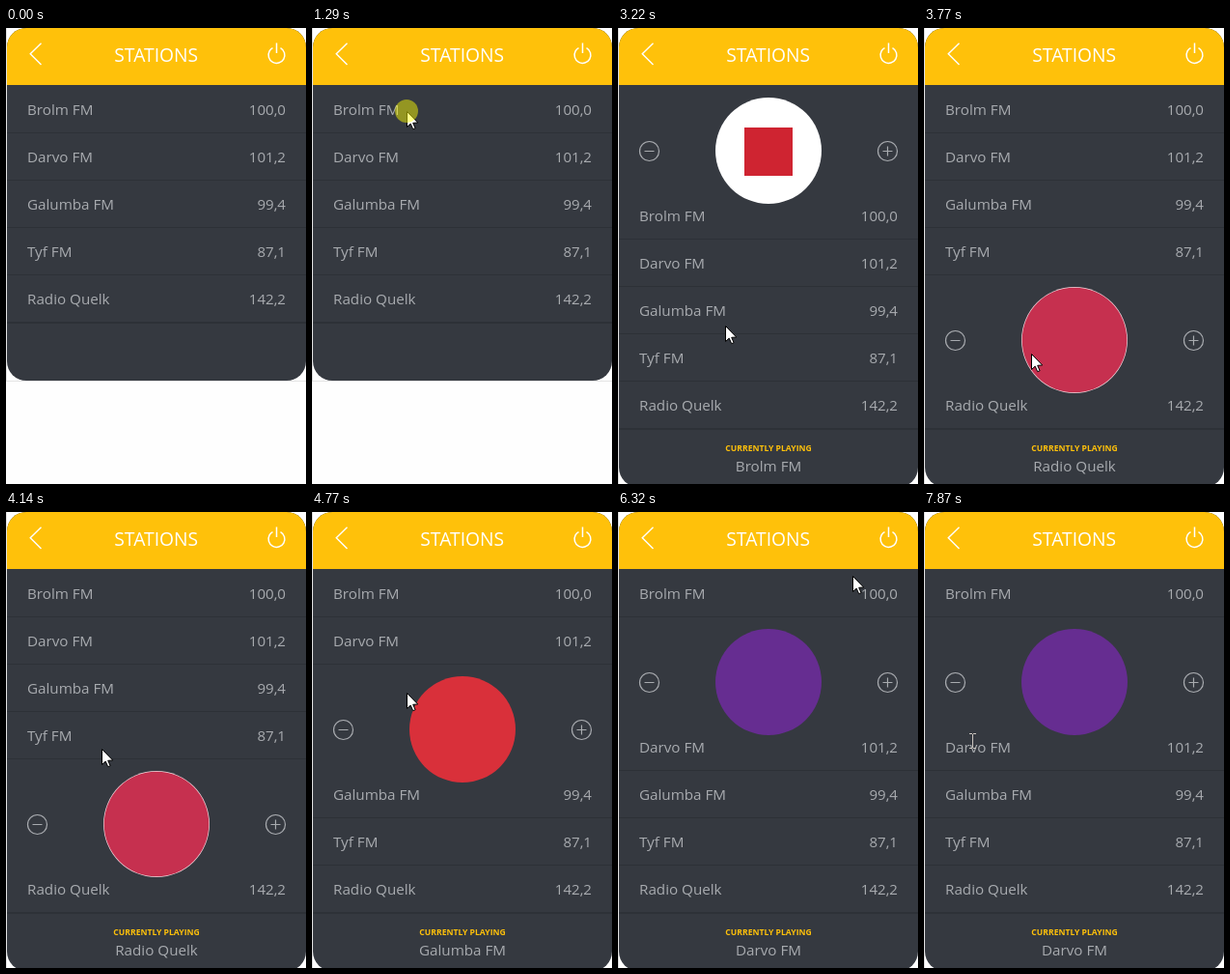
An HTML page with a canvas that plays this animation: 311 by 472 pixels, repeating every 8 s.

```html
<!DOCTYPE html>
<html lang="en">
<head>
<meta charset="utf-8">
<title>Stations</title>
<style>
html, body { margin: 0; width: 100%; height: 100%; overflow: hidden; background: #fefefe; }
canvas { display: block; width: 311px; height: 472px; }
</style>
</head>
<body>
<canvas id="stage"></canvas>
<script>
const W = 311, H = 472, LOOP = 8000, STEP = 75;
const HEADER = 60, ROW = 49, FOOTER = 60, GROW = 110, RADIUS = 55;
const MID = 156, LEFT = 22, RIGHT = 290;
const YELLOW = '#ffc10a', DARK = '#353940', GREY = '#a8abaf', RULE = '#2d3137', EDGE = '#e4e4e4';
const FONT = '"Open Sans", "Noto Sans", sans-serif';

const stations = [
  { name: 'Brolm FM', freq: '100,0', disc: '#fff', badge: '#cf2431' },
  { name: 'Darvo FM', freq: '101,2', disc: '#662d91' },
  { name: 'Galumba FM', freq: '99,4', disc: '#d9303a' },
  { name: 'Tyf FM', freq: '87,1', disc: '#fff' },
  { name: 'Radio Quelk', freq: '142,2', disc: '#c6304f', rim: '#f0d5db' }
];

const BUTTONS_AT = 1850;
const clicks = [
  { down: 1290, up: 1430, station: 0 },
  { down: 3530, up: 3610, station: 4 },
  { down: 4600, up: 4770, station: 2 },
  { down: 5240, up: 5390, station: 1 }
];

// Pointer stops: leave, arrive, x, y
const stops = [
  [210, 210, 223, 280],
  [290, 740, 98, 86],
  [2060, 2210, 100, 220],
  [2680, 2760, 106, 254],
  [3220, 3360, 117, 385],
  [3690, 4140, 99, 245],
  [4210, 4520, 98, 187],
  [4920, 5160, 94, 137],
  [5470, 6295, 243, 66],
  [6390, 6860, 166, 456],
  [7020, 7470, 47, 221],
  [7870, 7870, 50, 237]
];

const canvas = document.getElementById('stage');
const ctx = canvas.getContext('2d');
const dpr = window.devicePixelRatio || 1;
canvas.width = Math.round(W * dpr);
canvas.height = Math.round(H * dpr);

const mix = (a, b, p) => Math.round(a + (b - a) * p);

function text(str, x, y, size, color, align = 'left', weight = 400) {
  ctx.font = `${weight} ${size}px ${FONT}`;
  ctx.fillStyle = color;
  ctx.textAlign = align;
  ctx.fillText(str, x, y);
  const w = ctx.measureText(str).width;
  const left = x - w * { left: 0, center: 0.5, right: 1 }[align];
  return ([px, py]) => px > left && px < left + w && py > y - size && py < y + size / 4;
}

function rect(x, y, w, h, color) {
  ctx.fillStyle = color;
  ctx.fillRect(x, y, w, h);
}

function disc(x, y, r, color) {
  ctx.fillStyle = color;
  ctx.beginPath();
  ctx.arc(x, y, r, 0, Math.PI * 2);
  ctx.fill();
}

function arc(x, y, r, gap, color, width) {
  ctx.strokeStyle = color;
  ctx.lineWidth = width;
  ctx.beginPath();
  ctx.arc(x, y, r, gap - Math.PI / 2, Math.PI * 1.5 - gap);
  ctx.stroke();
}

function line(points, color, width) {
  ctx.strokeStyle = color;
  ctx.lineWidth = width;
  ctx.beginPath();
  points.forEach(([x, y]) => ctx.lineTo(x, y));
  ctx.stroke();
}

// The pointer moves in steps, slowing slightly towards each stop.
function pointerAt(t) {
  let pos = null;
  for (const [leave, arrive, x, y] of stops) {
    if (t < leave) break;
    const since = (Math.floor((t - leave) / STEP) + 1) * STEP;
    const p = Math.min(1, since / (arrive - leave + STEP));
    const e = 1 - (1 - p) ** 1.25;
    pos = pos ? [mix(pos[0], x, e), mix(pos[1], y, e)] : [x, y];
  }
  return pos;
}

function drawHeader() {
  rect(0, 0, W, HEADER - 1, YELLOW);
  line([[36.5, 15.7], [25.2, 26.8], [36.5, 38]], '#fff', 1.4);
  text('STATIONS', MID - 0.3, 35, 19.3, '#fff', 'center');
  line([[280.5, 15.5], [280.5, 26]], '#fff', 1.5);
  arc(280.5, 28, 8.4, 0.5, '#fff', 1.5);
}

function drawButton(x, y, plus) {
  line([[x - 5, y], [x + 5, y]], GREY, 1.2);
  if (plus) line([[x, y - 5], [x, y + 5]], GREY, 1.2);
  arc(x, y, 10, 0, GREY, 1.2);
}

function drawCover({ disc: color, rim, badge }, y, buttons) {
  disc(MID, y, RADIUS, rim || color);
  if (rim) disc(MID, y, RADIUS - 0.7, color);
  if (badge) rect(MID - 25, y - 24, 50, 50, badge);
  if (!buttons) return;
  drawButton(32.5, y + 0.5, false);
  drawButton(279.5, y + 0.5, true);
}

// Draws the card and returns hit tests for its selectable text.
function drawCard(t) {
  const click = clicks.filter(c => t >= c.up).pop();
  const open = click && stations[click.station];
  const bottom = HEADER + ROW * stations.length + FOOTER + (open ? GROW : 0);
  const hits = [];
  rect(0, 0, 1, bottom, EDGE);
  rect(0, bottom, W, 1, EDGE);

  ctx.save();
  ctx.beginPath();
  ctx.roundRect(1, 0, W - 1, bottom, 20);
  ctx.clip();
  rect(0, 0, W, bottom, DARK);
  drawHeader();

  let y = HEADER;
  for (const s of stations) {
    if (s === open) {
      drawCover(s, y + 12 + RADIUS, t >= BUTTONS_AT);
      y += GROW;
    }
    hits.push(text(s.name, LEFT, y + 30, 15.2, GREY));
    hits.push(text(s.freq, RIGHT, y + 30, 15.1, GREY, 'right'));
    y += ROW;
    rect(0, y - 1, W, 1, RULE);
  }
  rect(0, y, W, 1, RULE);

  if (open) {
    text('CURRENTLY PLAYING', MID, bottom - 37, 8.6, YELLOW, 'center', 700);
    hits.push(text(open.name, MID, bottom - 16, 15.2, GREY, 'center'));
  }
  ctx.restore();
  return hits;
}

function drawBeam(x, y) {
  const color = '#cbc5bf';
  rect(x, y - 7, 1, 14, color);
  for (const edge of [y - 8, y + 7]) {
    rect(x - 3, edge, 3, 1, color);
    rect(x + 1, edge, 3, 1, color);
  }
}

function drawArrow(x, y) {
  const shape = [[0, 0], [0, 16], [3.7, 12.6], [6.2, 18.2], [8.6, 17.2], [6.2, 11.8], [11.2, 11.5]];
  ctx.beginPath();
  shape.forEach(([dx, dy]) => ctx.lineTo(x + dx + 0.5, y + dy + 0.5));
  ctx.closePath();
  ctx.fillStyle = '#fff';
  ctx.fill();
  ctx.strokeStyle = '#000';
  ctx.lineWidth = 1;
  ctx.stroke();
}

function draw(t) {
  ctx.setTransform(dpr, 0, 0, dpr, 0, 0);
  rect(0, 0, W, H, '#fefefe');
  const hits = drawCard(t);
  const pos = pointerAt(t);
  if (!pos) return;
  const overText = hits.some(hit => hit(pos));
  (overText ? drawBeam : drawArrow)(...pos);
  if (clicks.some(c => t >= c.down && t < c.up)) disc(...pos, 12, 'rgba(255, 255, 0, 0.47)');
}

const started = performance.now();
function tick() {
  draw((performance.now() - started) % LOOP);
  requestAnimationFrame(tick);
}
tick();
</script>
</body>
</html>
```
